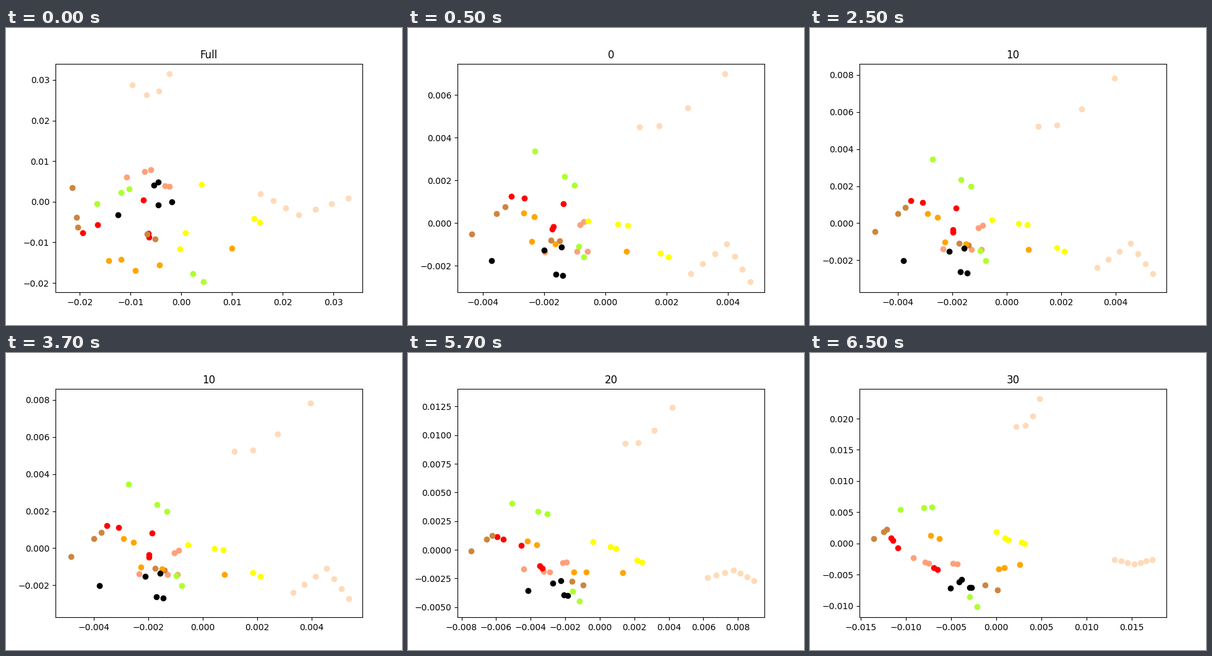
A matplotlib script for the animation above (8 s loop, 640 px wide and 480 px high).

```python
import numpy as np
import matplotlib.pyplot as plt
from matplotlib.animation import FuncAnimation

WIDTH, HEIGHT, DPI = 640, 480, 100
STEP_MS = 500
GROWTH = 2.7  # the embedding spreads as a power of the training step

# Title and axis limits of each snapshot
SNAPSHOTS = [
    ("Full", (-0.02479, 0.03570), (-0.02230, 0.03402)),
    ("0", (-0.004828, 0.005192), (-0.003239, 0.007459)),
    ("10", (-0.005409, 0.005864), (-0.003731, 0.008614)),
    ("20", (-0.008236, 0.009531), (-0.005887, 0.014048)),
    ("30", (-0.015137, 0.018836), (-0.011855, 0.024810)),
]

# Where dots sit on a path of two legs: pairs at both ends and one at the bend
PAIRED = (0, 0.25, 1, 1.9, 2)

fig, ax = plt.subplots(figsize=(WIDTH / DPI, HEIGHT / DPI), dpi=DPI)
box = ax.get_position()
clusters = []


def along(path, legs):
    """Points on the polyline through the path's start, bend and end."""
    return np.column_stack([np.interp(legs, range(3), axis)
                            for axis in zip(*path)])


def to_data(points, snapshot):
    """Convert stage pixels to the data units of a snapshot's axes."""
    _, xlim, ylim = snapshot
    stage = np.array([0, 1]) + points / np.array([WIDTH, -HEIGHT])
    low, high = np.transpose([xlim, ylim])
    return low + (stage - box.p0) / box.size * (high - low)


def add_cluster(color, full, first, last, legs=PAIRED):
    full, first, last = (
        to_data(along(path, legs), SNAPSHOTS[index])
        for path, index in ((full, 0), (first, 1), (last, -1)))
    trained = [first + (last - first) * (step / 30) ** GROWTH
               for step in (0, 10, 20, 30)]
    dots = ax.scatter(*full.T, color=color)
    clusters.append((dots, [full, *trained]))


add_cluster("peachpuff",
            full=((204, 92), (238, 116), (264, 74)),
            first=((374, 160), (422, 157), (512, 74)),
            last=((333, 119), (355, 116), (371, 74)),
            legs=np.linspace(0, 2, 4))
add_cluster("peachpuff",
            full=((411, 268), (473, 302), (553, 275)),
            first=((457, 397), (515, 349), (553, 410)),
            last=((492, 334), (524, 341), (553, 334)),
            legs=np.linspace(0, 2, 7))
add_cluster("lightsalmon",
            full=((234, 229), (195, 241), (264, 256)),
            first=((290, 361), (221, 362), (284, 313)),
            last=((192, 340), (167, 331), (238, 341)))
add_cluster("red",
            full=((124, 331), (222, 278), (231, 338)),
            first=((167, 272), (251, 284), (233, 325)),
            last=((131, 299), (142, 315), (206, 350)))
add_cluster("greenyellow",
            full=((199, 260), (147, 284), (319, 410)),
            first=((269, 254), (205, 199), (284, 370)),
            last=((197, 249), (146, 253), (270, 410)))
add_cluster("peru",
            full=((116, 322), (107, 258), (241, 341)),
            first=((157, 289), (103, 333), (245, 344)),
            last=((124, 285), (103, 300), (303, 383)))
add_cluster("orange",
            full=((209, 392), (365, 356), (166, 376)),
            first=((200, 345), (353, 361), (187, 299)),
            last=((305, 349), (339, 342), (195, 295)))
add_cluster("yellow",
            full=((281, 357), (316, 253), (410, 314)),
            first=((355, 319), (291, 312), (421, 370)),
            last=((320, 302), (301, 289), (347, 308)))
add_cluster("black",
            full=((268, 281), (181, 302), (246, 249)),
            first=((248, 354), (135, 376), (250, 400)),
            last=((245, 366), (227, 380), (261, 379)))


def update(step):
    # The first snapshot lasts one step, the others four
    index = (step + 3) // 4
    title, xlim, ylim = SNAPSHOTS[index]
    ax.set_title(title)
    ax.set_xlim(xlim)
    ax.set_ylim(ylim)
    for dots, positions in clusters:
        dots.set_offsets(positions[index])


animation = FuncAnimation(fig, update, frames=16, interval=STEP_MS,
                          init_func=lambda: update(0), repeat=True)
plt.show()
```
